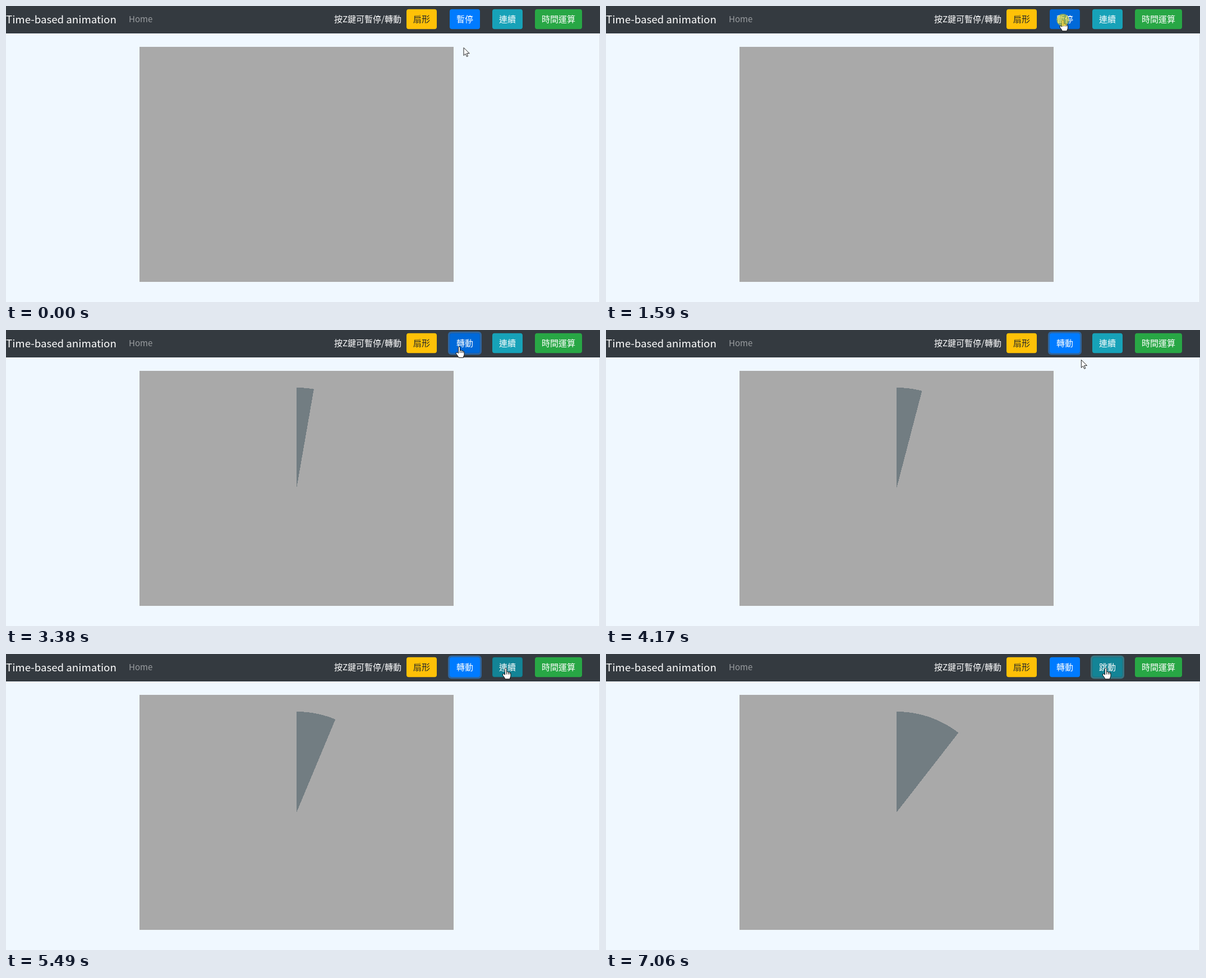
Animation, 1059 px wide and 529 px high, one loop 8 s. Source, as an HTML page with a canvas:

```html
<!DOCTYPE html>
<html lang="zh-Hant">
<head>
<meta charset="utf-8">
<title>Time-based animation</title>
<style>
html, body { margin: 0; width: 100%; height: 100%; overflow: hidden; background: #f0f8ff; }
canvas { display: block; }
</style>
</head>
<body>
<canvas id="stage" width="1059" height="529"></canvas>
<script>
const ctx = document.getElementById('stage').getContext('2d');
const LOOP = 8000, TICK = 78.75, START = 1730, SWITCH = 6050;
const FONT = '"Noto Sans CJK TC", "Noto Sans CJK", "Noto Sans", sans-serif';

// Pointer hot spot: time, x, y
const PATH = [
  [263, 815.5, 74], [880, 814.5, 25], [2700, 814.5, 25], [3300, 808, 29.5],
  [3780, 808, 29.5], [4170, 846.5, 53], [4260, 871, 46], [4500, 889, 28], [4700, 891, 25]
];

const ARROW = new Path2D('M.5 .5V14.5L3.6 11.5L6 16.5L8 15.6L5.8 10.7H10.7Z');
const HAND = new Path2D('M-1.5 12V1.6Q-1.5 .3 0 .3Q1.5 .3 1.5 1.6V7Q3.5 6 4.5 7.6' +
  'Q6.3 7 7 8.6Q9 8.2 9 10.2V14Q9 16 7.5 18V19.8H-1Q-2 17 -5.5 13Q-6.3 10 -3.5 10.6Z');
const FINGERS = new Path2D('M1.5 7V11.5M4.5 8V11.5M7 9V11.5');

function snap(t) {
  if (t < 340) return 0;
  if (t < 880) return 340 + 77 * Math.floor((t - 340) / 77);
  if (t < START) return t;
  return START + TICK * Math.floor((t - START + 22) / TICK);
}

function pointerAt(t) {
  if (t <= PATH[0][0]) return PATH[0].slice(1);
  for (let i = 1; i < PATH.length; i++) {
    const [t0, x0, y0] = PATH[i - 1], [t1, x1, y1] = PATH[i];
    if (t < t1) {
      const p = (t - t0) / (t1 - t0);
      return [x0 + (x1 - x0) * p, y0 + (y1 - y0) * p];
    }
  }
  return PATH[PATH.length - 1].slice(1);
}

function angleAt(t) {
  if (t >= 7060) return 37.8;
  if (t >= 6140) return 31.8;
  return t < START ? 0 : Math.max(0, 0.006 * (Math.min(snap(t), SWITCH) - 1740));
}

function box(x, y, w, h, r, fill) {
  ctx.fillStyle = fill;
  ctx.beginPath();
  ctx.roundRect(x, y, w, h, r);
  ctx.fill();
}

function text(str, x, y, size, fill, weight = 400) {
  ctx.font = `${weight} ${size}px ${FONT}`;
  ctx.fillStyle = fill;
  ctx.fillText(str, x, y);
}

function button(b, hover, focus) {
  if (focus) box(b.x - 3, 2.8, b.w + 6, 41.4, 6, b.ring);
  box(b.x, 5.8, b.w, 35.4, 4, hover ? b.edge : b.fill);
  if (hover) box(b.x + 1, 6.8, b.w - 2, 33.4, 3, b.hover);
  text(b.label, b.x + 12, 29.2, 15, b.ink || '#fff', 500);
}

function sector(deg) {
  const R = 180, slope = Math.tan(deg * Math.PI / 180);
  ctx.fillStyle = '#727d82';
  for (let row = 0; row < R; row++) {
    const d = row + 0.5;
    const w = Math.round(Math.min(d * slope, Math.sqrt(R * R - d * d)));
    if (w > 0) ctx.fillRect(518, 282 - row, w, 1);
  }
}

function pointer(x, y, hand) {
  ctx.save();
  ctx.translate(x, y);
  ctx.lineWidth = 1;
  ctx.lineJoin = 'round';
  ctx.strokeStyle = hand ? '#111' : '#222';
  ctx.fillStyle = '#fff';
  ctx.fill(hand ? HAND : ARROW);
  ctx.stroke(hand ? HAND : ARROW);
  if (hand) ctx.stroke(FINGERS);
  ctx.restore();
}

function draw(t) {
  const [px, py] = pointerAt(snap(t));
  const buttons = [
    { x: 714, w: 54, label: '扇形', fill: '#ffc107', ink: '#212529' },
    { x: 791, w: 54, label: t < START ? '暫停' : '轉動', fill: '#007bff',
      hover: '#0069d9', edge: '#0062cc', ring: 'rgba(38,143,255,.5)' },
    { x: 867, w: 54, label: t < SWITCH ? '連續' : '跳動', fill: '#17a2b8',
      hover: '#138496', edge: '#117a8b', ring: 'rgba(58,176,195,.5)' },
    { x: 943, w: 84, label: '時間運算', fill: '#28a745' }
  ];
  const over = buttons.findIndex(b => px >= b.x && px < b.x + b.w && py >= 6 && py < 41);
  const focus = t < START ? -1 : t < SWITCH ? 1 : 2;

  ctx.fillStyle = '#f0f8ff';
  ctx.fillRect(0, 0, 1059, 529);
  ctx.fillStyle = '#d9dfe5';
  ctx.fillRect(1058, 49, 1, 480);
  ctx.fillStyle = '#343a40';
  ctx.fillRect(0, 0, 1059, 49);
  ctx.fillStyle = '#a9a9a9';
  ctx.fillRect(238, 73, 560, 420);

  text('Time-based animation', 0, 30.7, 18.7, '#fff');
  text('Home', 219, 29.2, 15, 'rgba(255,255,255,.5)');
  text('按Z鍵可暫停/轉動', 585, 29.2, 15, '#fff', 500);
  buttons.forEach((b, i) => button(b, i === over, i === focus));

  sector(angleAt(t));
  pointer(px, py, over >= 0);

  const pressed = (t >= 1590 && t < START) || (t >= 5975 && t < SWITCH);
  if (pressed) {
    ctx.fillStyle = 'rgba(255,225,0,.55)';
    ctx.beginPath();
    ctx.arc(px, 25, 11, 0, Math.PI * 2);
    ctx.fill();
  }
}

function frame(now) {
  draw(now % LOOP);
  requestAnimationFrame(frame);
}
draw(0);
requestAnimationFrame(frame);
</script>
</body>
</html>
```
